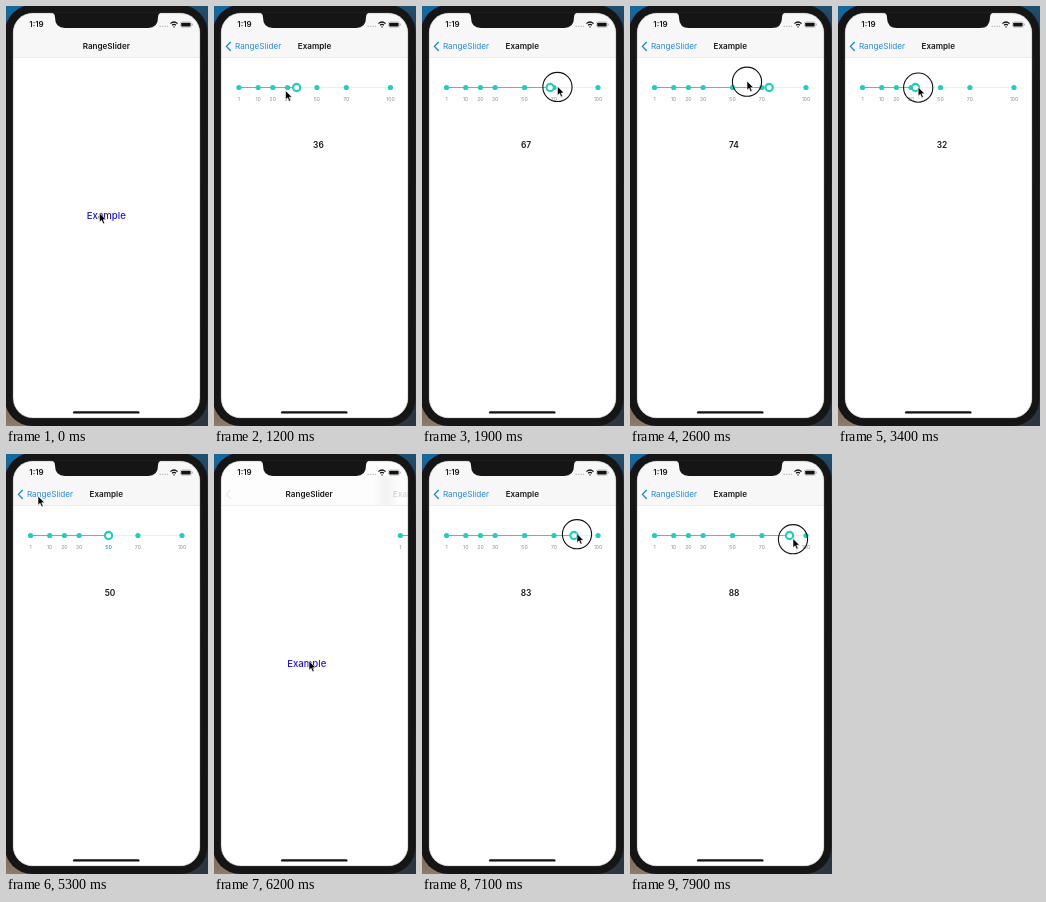
An HTML page for the animation above (8000 ms loop, 202 px wide and 420 px high).

```html
<!DOCTYPE html>
<html lang="en">
<head>
<meta charset="utf-8">
<title>Range slider</title>
<style>
  html, body { margin: 0; width: 100%; height: 100%; overflow: hidden; background: #151515; }
  svg { display: block; width: 202px; height: 420px; }
  text { font-family: Inter, Roboto, sans-serif; text-anchor: middle; }
  .title { font-size: 8.1px; font-weight: 600; fill: #1a1a1a; }
  .tick { font-size: 5.2px; fill: #8e8e93; }
  .tick.on { fill: #1aa9b8; font-weight: 600; }
</style>
</head>
<body>
<svg viewBox="0 0 202 420">
  <defs>
    <clipPath id="screen"><rect x="7" y="7" width="187" height="405" rx="20"/></clipPath>
    <linearGradient id="shade">
      <stop offset="0" stop-color="#999" stop-opacity="0"/>
      <stop offset=".5" stop-color="#999" stop-opacity=".13"/>
      <stop offset="1" stop-color="#999" stop-opacity="0"/>
    </linearGradient>
    <linearGradient id="wallpaper" x2="0" y2="1">
      <stop offset="0" stop-color="#17699c"/>
      <stop offset=".3" stop-color="#12344b"/>
      <stop offset=".8" stop-color="#2b2a28"/>
      <stop offset="1" stop-color="#8c7d68"/>
    </linearGradient>
    <linearGradient id="wallpaperRight" x2="0" y2="1">
      <stop offset="0" stop-color="#1f4f70"/>
      <stop offset=".2" stop-color="#16212a"/>
      <stop offset="1" stop-color="#2c3640"/>
    </linearGradient>
  </defs>

  <rect width="202" height="420" fill="url(#wallpaper)"/>
  <rect x="150" width="52" height="420" fill="url(#wallpaperRight)"/>
  <rect x="-1" y="-1" width="202.5" height="421" rx="27" fill="#151515"/>

  <g clip-path="url(#screen)">
    <rect x="7" y="7" width="187" height="405" fill="#fff"/>
    <text id="home" x="100.3" y="213" font-size="9.6" font-weight="500" fill="#1e14e2">Example</text>

    <g id="detail">
      <rect x="7" y="52" width="187" height="360" fill="#fff"/>
      <path d="M24.5 81.5H176.5" stroke="#eeefef" stroke-width="1"/>
      <path id="range" stroke="#35cfc0" stroke-width="1.2"/>
      <g id="ticks"></g>
      <circle id="thumb" cy="81.5" r="3.6" fill="#fff" stroke="#1fd0bf" stroke-width="2.2"/>
      <text id="value" x="104" y="142.2" font-size="8.4" font-weight="600" fill="#1a1a1a"></text>
    </g>

    <rect id="header" x="7" y="7" width="187" height="44.5"/>
    <path d="M7 51.5H194" stroke="#dedede" stroke-width=".5"/>
    <rect id="shadow" y="22" width="26" height="29" fill="url(#shade)"/>
    <text id="homeTitle" class="title" y="43">RangeSlider</text>
    <text id="detailTitle" class="title" y="43">Example</text>
    <text id="backLabel" y="43" font-size="8.15" fill="#2585f0">RangeSlider</text>
    <path id="chevron" d="M16.3 36.3L12.4 40.4L16.3 44.5" fill="none" stroke="#1a7ff0" stroke-width="1.3"
          stroke-linecap="round" stroke-linejoin="round"/>

    <text x="30.5" y="21.3" font-size="8" font-weight="600" fill="#1a1a1a">1:19</text>
    <path d="M153.5 20.3H162" stroke="#bbb" stroke-width="1.2" stroke-dasharray="1.3 1.1"/>
    <g fill="none" stroke="#111" stroke-width="1.2">
      <path d="M164.4 17.6Q168 14.4 171.6 17.6M166 19.3Q168 17.6 170 19.3"/>
      <path d="M167.4 20.8H168.6"/>
    </g>
    <rect x="174.4" y="15.9" width="11" height="5.4" rx="1.5" fill="#fff" stroke="#999" stroke-width=".5"/>
    <rect x="175.2" y="16.7" width="9.4" height="3.8" rx=".8" fill="#111"/>
    <path d="M186.4 17.7V19.5" stroke="#999" stroke-width=".7"/>
    <rect x="67" y="405.2" width="66.5" height="2.4" rx="1.2" fill="#111"/>
  </g>

  <rect x="7" y="7" width="187" height="405" rx="20" fill="none" stroke="#777" stroke-opacity=".5" stroke-width=".8"/>
  <path d="M45 6.5Q49 7 49 11.5Q49 22 59 22H142Q152 22 152 11.5Q152 7 156 6.5Z" fill="#151515"/>

  <g id="cursor">
    <circle id="touch" cy=".7" r="14.6" fill="none" stroke="#111" stroke-width="1.1"/>
    <path d="M0 0V9.2L2.1 7.3L3.6 10.8L5.2 10.1L3.7 6.7H6.6Z" fill="#000" stroke="#fff" stroke-width=".6"/>
  </g>
</svg>

<script>
const LOOP = 8000;
const START_VALUE = 36.2;
const el = id => document.getElementById(id);
const set = (id, attrs) => {
  for (const name in attrs) el(id).setAttribute(name, attrs[name]);
};
const clamp = v => Math.max(0, Math.min(1, v));

// Keys: [time, x, y]
const cursorPath = [
  [0, 93.5, 207], [500, 93.5, 207], [1200, 71.5, 84.5], [1400, 82, 83],
  [2200, 160, 79], [2600, 117, 75], [3100, 70, 80], [3900, 102, 83], [4500, 102, 83],
  [5100, 32, 42], [5350, 32, 42], [5950, 95, 207], [6250, 95, 207],
  [6600, 82, 84], [6680, 84, 83], [7100, 155, 79.5], [7900, 163, 84.5], [8000, 164, 85]
];
// Keys: [time, value]
const valuePath = [
  [0, START_VALUE], [1430, START_VALUE], [2280, 90], [2600, 74.9], [3180, 28], [3900, 50],
  [5999, 50], [6000, START_VALUE], [6690, START_VALUE], [7100, 83.6], [7900, 88.8], [8000, 89.3]
];

function sample(keys, t) {
  const i = Math.max(1, keys.findIndex(k => k[0] >= t));
  const [a, b] = [keys[i - 1], keys[i]];
  const u = clamp((t - a[0]) / (b[0] - a[0]));
  const e = u * u * (3 - 2 * u);
  return a.slice(1).map((v, n) => v + (b[n + 1] - v) * e);
}

// Critically damped spring from 0 to 1
function spring(t) {
  const w = Math.max(0, t) * 0.011;
  return 1 - (1 + w) * Math.exp(-w);
}

const valueX = v => v < 10 ? 24.5 + (v - 1) * 2.14 : 29 + 1.47 * v;
const ticks = [1, 10, 20, 30, 50, 70, 100];
el('ticks').innerHTML = ticks.map(v => {
  const x = valueX(v);
  return `<circle cx="${x}" cy="81.5" r="2.6" fill="#1fd0bf"/><text class="tick" x="${x}" y="95">${v}</text>`;
}).join('');
const tickLabels = [...document.querySelectorAll('.tick')];

function navigation(t) {
  if (t < 5300) return spring(t - 443);
  if (t < 6143) return 1 - spring(t - 5300);
  return spring(t - 6143);
}

function draw(t) {
  const p = navigation(t);
  const moving = p > 0.01 && p < 0.98;
  const titleX = 100.3 - 56.3 * p ** 1.2;
  set('home', { transform: `translate(${-56 * p})` });
  set('detail', { transform: `translate(${187 * (1 - p)})` });
  set('header', { fill: moving ? '#fdfdfd' : '#f7f7f7' });
  set('shadow', { x: 184 - 187 * p, opacity: moving ? 1 - p : 0 });
  set('homeTitle', { x: titleX, opacity: clamp(1.3 - 1.5 * p) });
  set('backLabel', { x: titleX, opacity: clamp((p - 0.3) / 0.7) });
  set('detailTitle', { x: 100.3 + 110 * (1 - p), opacity: clamp(p * 1.2) });
  set('chevron', { opacity: p });

  const [value] = sample(valuePath, t);
  const x = valueX(value);
  const shown = Math.floor(value);
  set('range', { d: `M24.5 81.5H${x}` });
  set('thumb', { cx: x });
  el('value').textContent = shown;
  tickLabels.forEach((label, i) => label.classList.toggle('on', ticks[i] === shown));

  const [cx, cy] = sample(cursorPath, t);
  const pressed = (t >= 1400 && t < 3950) || t >= 6680;
  set('cursor', { transform: `translate(${cx} ${cy})` });
  set('touch', { opacity: pressed ? 1 : 0 });
}

const start = performance.now();
function frame() {
  draw((performance.now() - start) % LOOP);
  requestAnimationFrame(frame);
}
frame();
</script>
</body>
</html>
```
